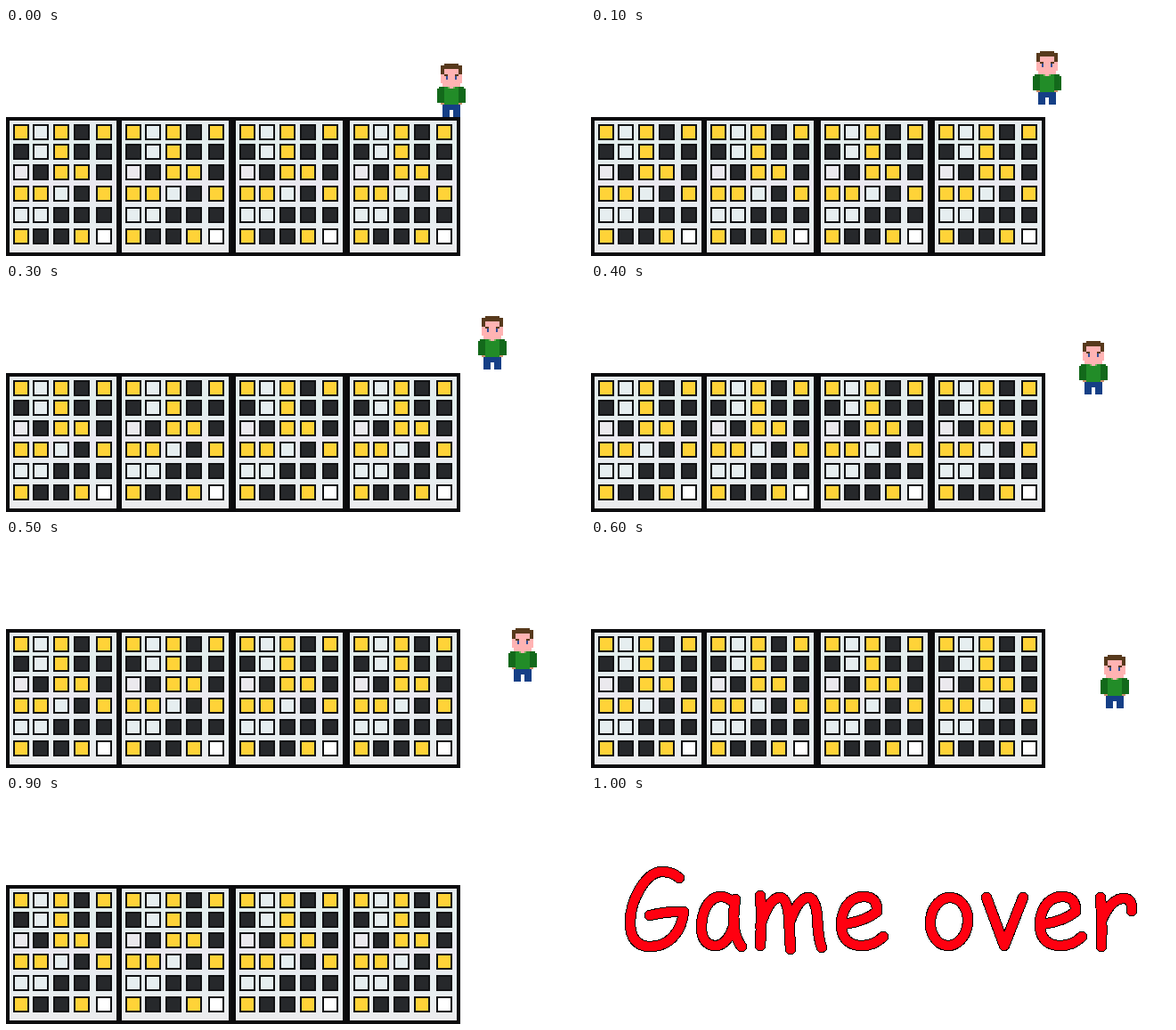
Write an HTML page that moves like this. It is 650 by 256 pixels and loops after 1.1 s.

```html
<!DOCTYPE html>
<html lang="en">
<head>
<meta charset="utf-8">
<title>Rooftop fall</title>
<style>
html, body { margin: 0; width: 100%; height: 100%; overflow: hidden; background: #fff; }
svg { display: block; }
#over { fill: none; stroke-linecap: round; stroke-linejoin: round; }
</style>
</head>
<body>
<svg width="650" height="256" viewBox="0 0 650 256" shape-rendering="crispEdges">
  <defs>
    <linearGradient id="wall" x2="0" y2="1">
      <stop offset="0" stop-color="#e6ebee"/>
      <stop offset=".22" stop-color="#e1eeec"/>
      <stop offset=".5" stop-color="#ebe8f1"/>
      <stop offset=".72" stop-color="#e6eef0"/>
      <stop offset="1" stop-color="#ececee"/>
    </linearGradient>
    <g id="e">
      <path d="M283 144Q307 141 321 130Q322 113 306 113C290 113 281 128 281 145C281 160 290 168 304 168Q318 168 328 158"/>
    </g>
    <g id="words">
      <path d="M99 92Q91 85 80 85C62 85 44 116 44 142C44 160 52 169 66 169C88 169 102 152 104 130Q88 129 66 134"/>
      <path d="M160 119Q152 113 146 113C132 113 124 130 124 148C124 160 130 168 140 168C150 168 158 156 161 142M162 116Q159 135 161 150Q164 163 169 169"/>
      <path d="M190 112Q192 135 190 168M190 146Q200 114 212 114Q220 114 222 135L224 172M222 145Q232 114 244 114Q252 114 254 135Q255 160 259 170"/>
      <use href="#e"/>
      <ellipse cx="402" cy="141" rx="21" ry="27" transform="rotate(6 402 141)"/>
      <path d="M444 114L464 168L485 114"/>
      <use href="#e" x="223"/>
      <path d="M572 114Q574 140 573 169M573 140Q584 115 598 115Q608 115 607 129"/>
    </g>
  </defs>
  <g id="city"></g>
  <g id="man"></g>
  <g id="over" role="img" aria-label="Game over">
    <use href="#words" stroke="#000" stroke-width="12.5"/>
    <use href="#words" stroke="#ff0010" stroke-width="10.5"/>
  </g>
</svg>
<script>
const $ = id => document.getElementById(id);
const box = (x, y, w, h, fill) => `<rect x="${x}" y="${y}" width="${w}" height="${h}" fill="${fill}"/>`;

// Building: four identical blocks of lit, pale and dark windows
const tones = { Y: '#ffd338', L: '#e6eef0', D: '#26282b', P: '#ebe9ee', W: '#fff' };
const cols = [8, 30, 53, 76, 101], rows = [108, 130, 153, 177, 201, 225];
const lights = ['YLYDY', 'DLYDD', 'PDYYD', 'YYLDY', 'LLDDD', 'YDDYW'];
const block = dx => box(dx + 4, 104, 120, 148, 'url(#wall)') +
  rows.map((y, r) => cols.map((x, c) =>
    box(x + dx, y, 18, 18, '#111214') +
    box(x + dx + 2, y + 2, 14, 14, tones[lights[r][c]])).join('')).join('');
$('city').innerHTML = box(0, 100, 510, 156, '#0b0b0d') + [0, 126, 254, 382].map(block).join('');

// Man, built from 2px blocks on a 32 x 60 area
const hair = '#57391c', skin = '#ffb3b3', sleeve = '#13691b', shirt = '#228c28', jeans = '#153f86';
$('man').innerHTML = [
  [8, 0, 16, 4, hair], [4, 2, 24, 8, hair],
  [6, 6, 20, 20, skin], [4, 10, 24, 12, skin],
  [4, 6, 4, 6, hair], [24, 6, 4, 6, hair],
  [8, 12, 4, 2, hair], [20, 12, 4, 2, hair],
  [10, 14, 2, 4, '#34509a'], [20, 14, 2, 4, '#34509a'],
  [2, 26, 28, 18, sleeve], [0, 28, 32, 16, sleeve],
  [8, 26, 16, 20, shirt], [12, 26, 8, 2, '#74b45a'], [14, 26, 4, 2, skin],
  [4, 44, 4, 2, '#c98f69'], [24, 44, 4, 2, '#c98f69'],
  [6, 46, 20, 6, jeans], [6, 52, 8, 8, jeans], [18, 52, 8, 8, jeans]
].map(b => box(...b)).join('');

// Jump off the roof, one pose per 100 ms
const leap = [[484, 40], [496, 26], [509, 20], [530, 36], [548, 64],
  [564, 99], [572, 129], [579, 169], [585, 214]];
const show = (id, on) => $(id).setAttribute('visibility', on ? 'visible' : 'hidden');

function draw() {
  const step = Math.floor(performance.now() % 1100 / 100);
  const pos = leap[step], ended = step === 10;
  show('city', !ended);
  show('over', ended);
  show('man', pos);
  if (pos) $('man').setAttribute('transform', `translate(${pos})`);
  requestAnimationFrame(draw);
}
draw();
</script>
</body>
</html>
```
